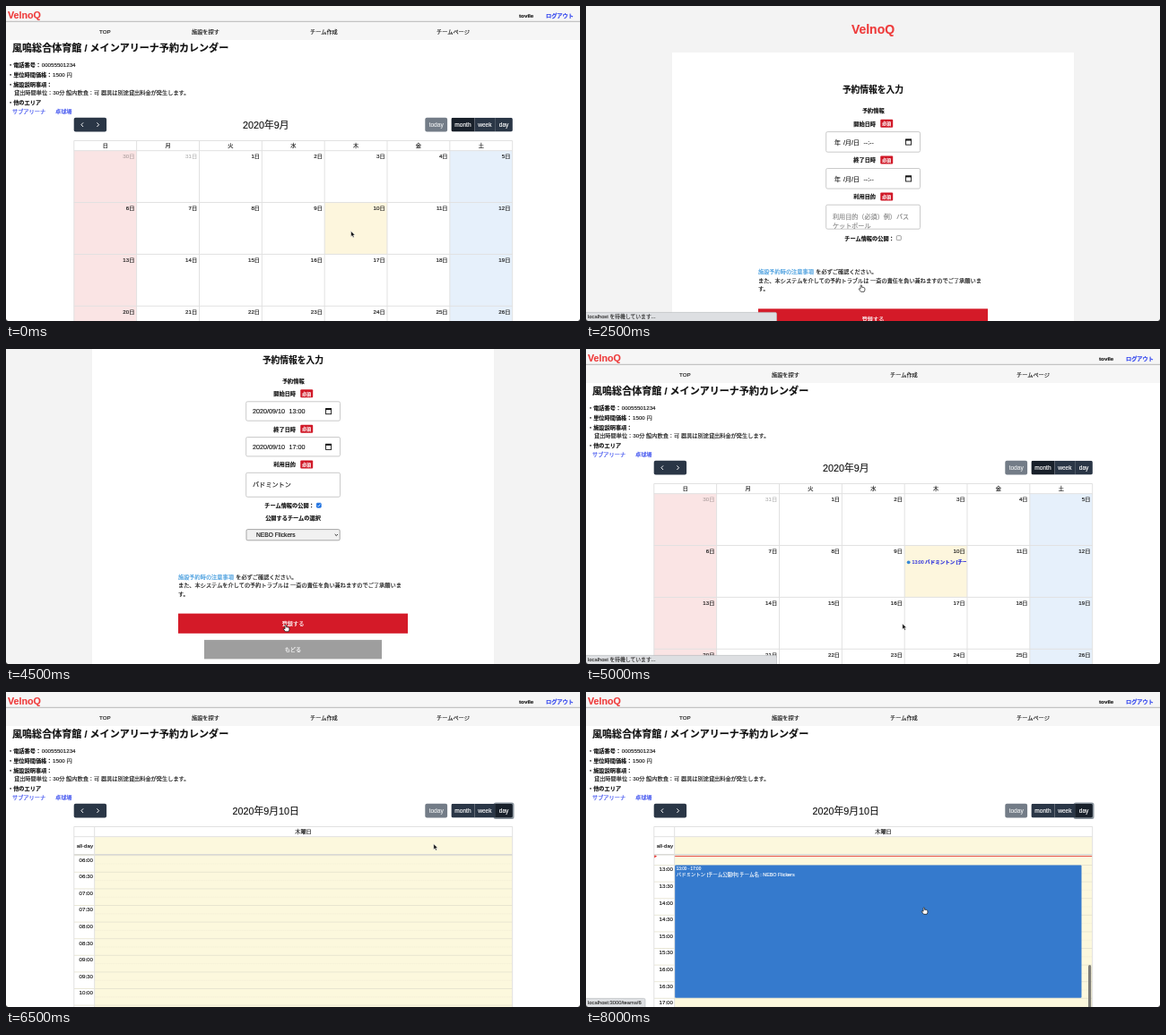
These frames come from a looping animation (640x352 px, 8.5 s). An HTML page:

```html
<!DOCTYPE html>
<html lang="ja">
<head>
<meta charset="utf-8">
<title>予約カレンダー</title>
<style>
  html, body { margin: 0; width: 100%; height: 100%; overflow: hidden; background: #fff; }
  svg { display: block; width: 640px; height: 352px; }
  text { font-family: "Liberation Sans", "Noto Sans CJK JP", "Noto Sans CJK", sans-serif; stroke-width: .14px; }
</style>
</head>
<body>
<svg id="stage" viewBox="0 0 640 352"></svg>
<script>
const BRAND = 'VelnoQ', USER = 'tovile', HALL = '風鳴総合体育館', PHONE = '00055501234', TEAM = 'NEBO Flickers';
const RED = '#ee3b3b', LINK = '#2f43ee', NAVY = '#2a3646', DARK = '#18202a',
      TODAY = '#fdf6dd', DAY = '#fcf8dd', LINE = '#e1e1e1', BLUE = '#357acd';

const rect = (x, y, w, h, fill, more = '') =>
  `<rect x="${x}" y="${y}" width="${w}" height="${h}" fill="${fill}" ${more}/>`;
const line = (x1, y1, x2, y2, color = LINE, more = '') =>
  `<path d="M${x1} ${y1}L${x2} ${y2}" stroke="${color}" ${more}/>`;
const text = (x, y, str, size = 6.2, fill = '#151515', more = '') =>
  `<text x="${x}" y="${y}" font-size="${size}" fill="${fill}" stroke="${fill}" ${more}>${str}</text>`;
const BOLD = 'font-weight="700"', MID = 'text-anchor="middle"', END = 'text-anchor="end"';
const MIDBOLD = `${MID} ${BOLD}`;
const clip = (id, x, y, w, h, body, more = '') =>
  `<clipPath id="${id}">${rect(x, y, w, h, '#000', more)}</clipPath><g clip-path="url(#${id})">${body}</g>`;

function pageHead() {
  return rect(0, 0, 640, 38, '#f6f6f6') + line(0, 17.3, 640, 17.3, '#a8a8a8', 'stroke-width=".8"') +
    text(2, 13.5, BRAND, 10.7, RED, BOLD) +
    text(572, 12.6, USER, 6.25, '#151515', BOLD) +
    text(602, 12.8, 'ログアウト', 6.2, LINK, BOLD) +
    [[104, 'TOP'], [207, '施設を探す'], [339, 'チーム作成'], [480, 'チームページ']]
      .map(([x, s]) => text(x, 31, s)).join('') +
    text(7, 51.2, HALL + ' / メインアリーナ予約カレンダー', 11.05, '#111', BOLD) +
    [[68.4, '・電話番号：'], [79.4, '・単位時間価格：'], [90, '・施設説明事項：'], [110.4, '・他のエリア']]
      .map(([y, s]) => text(2, y, s, 6.2, '#111', BOLD)).join('') +
    text(39.7, 68.4, PHONE) + text(52, 79.4, '1500 円') +
    text(9, 99.2, '貸出時間単位：30分 館内飲食：可 器具は別途貸出料金が発生します。') +
    text(7, 119.6, 'サブアリーナ', 6.2, LINK) + text(55, 119.6, '卓球場', 6.2, LINK);
}

function toolbar(title, view, ring) {
  const top = 124.8, h = 15.8;
  const btn = (x, w, name, on) => rect(x, top, w, h, on ? DARK : NAVY) +
    text(x + w / 2, 135, name, 6.6, '#fff', MID);
  return rect(75.7, top, 36.4, h, NAVY, 'rx="2"') +
    '<path d="M86.1 130.4l-2.2 2.3 2.2 2.3M101.4 130.4l2.2 2.3-2.2 2.3" fill="none" stroke="#fff" stroke-width=".95"/>' +
    text(289.7, 137, title, 10.8, '#151515', MID) +
    rect(467.3, top, 24.8, h, '#737c87', 'rx="2"') + text(479.7, 135, 'today', 6.6, '#e8eaec', MID) +
    (ring ? rect(543.6, 123.4, 22.9, 18.6, '#8c969f', 'rx="2.5"') : '') +
    clip('views', 496.4, top, 68.5, h,
      btn(496.4, 26.1, 'month', view === 'month') + btn(522.5, 22.7, 'week') +
      btn(545.2, 19.7, 'day', view === 'day' || ring), 'rx="2"');
}

function month({ event, ring, scroll = 0 }) {
  const X = 75.8, Y = 161.7, W = 69.84, H = 57.85, R = X + 7 * W, B = Y + 6 * H;
  let s = pageHead() + toolbar('2020年9月', 'month', ring) +
    rect(X, Y, W, 6 * H, '#fae4e4') + rect(X + 6 * W, Y, W, 6 * H, '#e6f0fb') +
    rect(X + 4 * W, Y + H, W, H, TODAY);
  [...'日月火水木金土'].forEach((d, i) => s += text(X + (i + .5) * W, 158.4, d, 6.2, '#151515', MID));
  for (let i = 0; i < 42; i++) {
    const out = i < 2 || i > 31, n = i < 2 ? 30 + i : i < 32 ? i - 1 : i - 31;
    s += text(X + (i % 7 + 1) * W - 2.3, Y + (i / 7 | 0) * H + 8.7, n + '日', 6.2, '#151515',
      END + (out ? ' opacity=".32"' : ''));
  }
  s += line(X, 150.5, R, 150.5);
  for (let r = 0; r < 7; r++) s += line(X, Y + r * H, R, Y + r * H);
  for (let c = 0; c < 8; c++) s += line(X + c * W, 150.5, X + c * W, B);
  if (event) s += '<circle cx="359.7" cy="238.3" r="1.9" fill="#3788d8"/>' +
    clip('event', 355, 230, 69, 14, text(363.5, 240.3, '13:00', 5.3, '#1d22dd') +
      text(378, 240.3, 'バドミントン [チーム公開中]', 5.5, '#1d22dd', BOLD));
  s += text(320.3, 313 + 219, '予約画面へ', 11, '#222', MIDBOLD);
  return `<g transform="translate(0 ${-scroll})">${s}</g>`;
}

function day({ scroll = 0, bar }) {
  const L = 75.8, A = 98.7, R = 564.7, T = 182.7, H = 18.6, B = 352;
  const at = h => T + (h - 6) * 2 * H - scroll;
  let grid = '';
  for (let i = 0; i < 28; i++) {
    const y = T + i * H - scroll, h = 6 + (i >> 1);
    grid += line(L, y, R, y, '#e4e1cd', 'stroke-width=".8"') +
      line(A, y + H / 2, R, y + H / 2, '#e9e5cf', 'stroke-width=".6" stroke-dasharray="1 1"') +
      text(97, y + 6.9, `${h < 10 ? '0' + h : h}:${i % 2 ? '30' : '00'}`, 6.2, '#151515', END);
  }
  const top = at(13), now = at(12.731);
  grid += rect(99, top, 453.5, 8 * H - .5, BLUE, 'rx="1"') +
    text(100.7, top + 5.6, '13:00 - 17:00', 4.7, '#fff') +
    text(100.7, top + 12.3, `バドミントン [チーム公開中] チーム名 : ${TEAM}`, 5.4, '#fff') +
    line(A, now, R, now, '#e8302c', 'stroke-width=".8"') +
    `<path d="M76 ${now - 2}l3 2-3 2z" fill="#e8302c"/>`;
  return pageHead() + toolbar('2020年9月10日', 'day', true) +
    rect(A, 161.7, R - A, B - 161.7, DAY) +
    text(331.5, 158.4, '木曜日', 6.2, '#151515', MID) + text(97, 173.8, 'all-day', 6.2, '#151515', END) +
    clip('slots', L, T - 1, R - L + 1, B - T + 1, grid) +
    line(L, 150.5, R, 150.5) + line(L, 161.7, R, 161.7) + line(L, 181.7, R, 181.7, '#d9d9d5', 'stroke-width="1.6"') +
    [L, A, R].map(x => line(x, 150.5, x, B)).join('') +
    (bar ? rect(560, 183 + scroll * .489, 3.2, 105, '#7f7e78', 'rx="1.6"') : '');
}

const need = (y, name) => text(298.3, y + 2.3, name, 6.2, '#111', BOLD) +
  rect(328.3, y - 4.4, 13.9, 9, '#d01726', 'rx="1"') + text(335.2, y + 1.9, '必須', 5, '#fff', MIDBOLD);
const box = (y, h) => rect(267.7, y, 104.8, h, '#fff', 'rx="1.6" stroke="#c4c4c4" stroke-width=".9"');

function dateBox(y, h, time) {
  const c = y + h / 2, b = c + 3;
  return box(y, h) + (time
    ? text(275, b - .4, '2020/09/10', 7.2) + text(315.6, b - .4, time, 7.2)
    : text(277, b, '年', 7) + text(287, b, '/月/日', 7) + text(309.5, b, '--:--', 7)) +
    rect(356.6, c - 2.6, 6, 5.8, 'none', 'stroke="#111" stroke-width=".9"') +
    rect(356.2, c - 3.4, 6.8, 2, '#111');
}

function form({ filled, focus }) {
  const f = filled, d = f ? -81.5 : 0, note = f ? 254.5 : 297.2, h = f ? 21.4 : 22.6;
  const team = f ? 175 : 259.5;
  let s = rect(0, 0, 640, 352, '#f3f3f3') + rect(96, f ? 0 : 52, 448, 352, '#fff') +
    (f ? '' : text(320, 31.2, BRAND, 14, RED, MIDBOLD)) +
    text(320, 97.2 + d, '予約情報を入力', 9.75, '#111', MIDBOLD) +
    text(320.3, 119.4 + d, '予約情報', 6.2, '#111', MIDBOLD) +
    need(f ? 49.6 : 131.2, '開始日時') + dateBox(f ? 58.8 : 140.6, h, f && '13:00') +
    need(f ? 89.2 : 172, '終了日時') + dateBox(f ? 98.5 : 181.5, h, f && '17:00') +
    need(f ? 128.8 : 213, '利用目的') + box(f ? 138.3 : 222.2, 27);
  s += f ? text(275, 153.5, 'バドミントン', 7.1)
    : clip('area', 268, 223, 104, 26, text(275, 237.6, '利用目的（必須）例）バス', 7.1, '#858585') +
      text(275, 248.2, 'ケットボール', 7.1, '#858585'));
  s += text(288.3, team + 2.2, 'チーム情報の公開：', 6.2, '#111', BOLD) +
    rect(346.3, team - 2.8, 5, 5, f ? '#1a6fe0' : '#fff', `rx=".9" stroke="${f ? '#1a6fe0' : '#777'}" stroke-width=".7"`);
  if (f) {
    s += '<path d="M347.4 174.9l1.1 1.1 1.8-2.5" fill="none" stroke="#fff" stroke-width=".8"/>' +
      text(320, 191.3, '公開するチームの選択', 6.2, '#111', MIDBOLD) +
      (focus ? rect(267.8, 201.4, 104.6, 12.6, '#f1f1f1', 'rx="1.5" stroke="#3d6fc4" stroke-width="1.7"')
        : rect(268, 201.6, 104.2, 12.2, '#f1f1f1', 'rx="1.5" stroke="#858585" stroke-width=".7"')) +
      text(279, 210.1, TEAM, 6.67, '#111') +
      '<path d="M366.7 207l1.6 1.6 1.6-1.6" fill="none" stroke="#111" stroke-width=".9"/>';
  }
  return s + text(192, note + 2.2, '施設予約時の注意事項', 6.2, '#3b97dc') +
    text(256.3, note + 2.2, 'を必ずご確認ください。') +
    text(192, note + 11.7, 'また、本システムを介しての予約トラブルは 一斎の責任を負い兼ねますのでご了承願いま') +
    text(192, note + 21, 'す。') +
    rect(192, note + 41.1, 256, 22.2, '#d41a28') + text(320, note + 54.4, '登録する', 6.2, '#fff', MID) +
    rect(221, note + 70.6, 198, 21.3, '#9e9e9e') + text(320, note + 83.6, 'もどる', 6.2, '#fff', MID);
}

const arrow = (x, y) => `<path transform="translate(${x} ${y})" d="M0 0v6.2l1.4-1.3 1 2.3 1.2-.5-1-2.2h2z" fill="#111" stroke="#fff" stroke-width=".5"/>`;
const hand = (x, y) => `<path transform="translate(${x} ${y})" d="M-.9 3.8v-3q.8-1 1.5 0v2q2.8-.2 3.3 1.1v2l-.8 1.9h-3.6l-2.4-3q.6-1.1 2-.1z" fill="#fff" stroke="#111" stroke-width=".7"/>`;
const status = (str, w) => rect(-1, 342.4, w + 1, 11, '#dddfe2', 'rx="1.5" stroke="#b9bcc0" stroke-width=".7"') +
  text(2, 349.3, str, 5.8, '#333');
const WAIT = status('localhost を待機しています...', 212.5);
const HOVER = status('localhost:3000/teams/6', 66);
const pageBar = rect(635.8, 130, 3.3, 213.5, '#7b7b7b', 'rx="1.6"');
const corners = '<path d="M0 349.5q.3 2.2 2.5 2.5h-2.5zM640 349.5q-.3 2.2-2.5 2.5h2.5z" fill="#333"/>';

// One entry per half second: scene, its state, and what lies on top.
const STEP = 500;
const steps = [
  [month, {}, arrow(384.6, 251.6)],
  [month, {}, arrow(384.6, 251.6)],
  [month, {}, arrow(384.6, 251.6)],
  [month, { scroll: 219 }, arrow(309.3, 274.4) + pageBar],
  [month, { scroll: 219 }, hand(307, 311.5)],
  [form, {}, hand(307, 311.5) + WAIT],
  [form, {}, ''],
  [form, { filled: true, focus: true }, ''],
  [form, { filled: true, focus: true }, ''],
  [form, { filled: true }, hand(312, 308)],
  [month, { event: true }, arrow(352.8, 307) + WAIT],
  [month, { event: true }, hand(551, 133)],
  [month, { event: true, ring: true }, hand(551, 133)],
  [day, {}, arrow(476.8, 169.8)],
  [day, { scroll: 100, bar: true }, arrow(470, 230)],
  [day, { scroll: 215, bar: true }, hand(377, 240.5) + HOVER],
  [day, { scroll: 249.6, bar: true }, hand(377, 240.5) + HOVER]
];

const stage = document.getElementById('stage');
const start = performance.now();
let shown = -1;
function tick() {
  const i = Math.floor((performance.now() - start) / STEP) % steps.length;
  if (i !== shown) {
    const [scene, state, over] = steps[shown = i];
    stage.innerHTML = scene(state) + over + corners;
  }
  requestAnimationFrame(tick);
}
tick();
</script>
</body>
</html>
```
